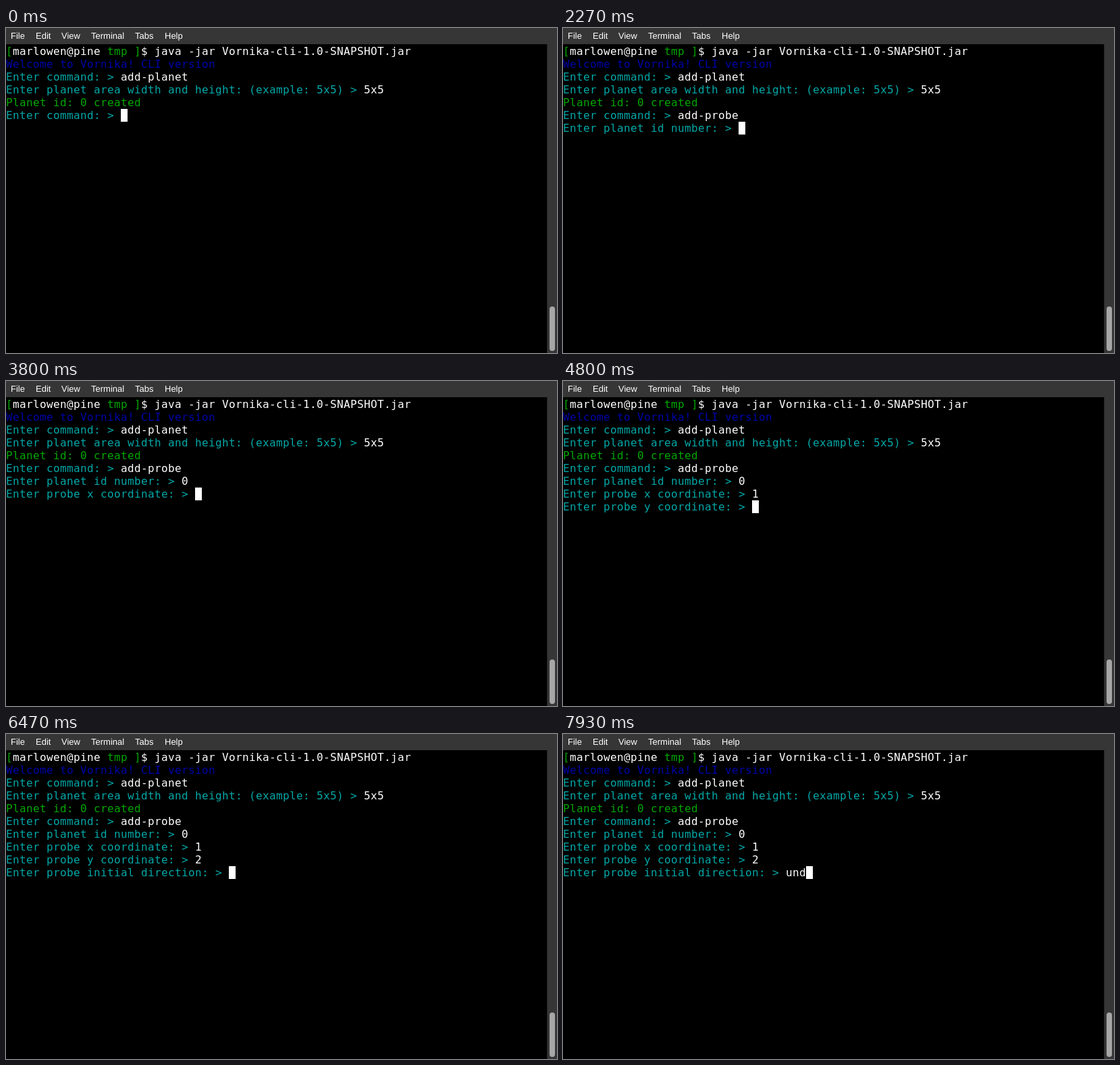
An HTML page that plays this animation: 816x482 px, repeating every 8 s.

```html
<!DOCTYPE html>
<html lang="en">
<head>
<meta charset="utf-8">
<title>Terminal session</title>
<style>
  html, body { margin: 0; width: 100%; height: 100%; overflow: hidden; background: #000; }
  svg { display: block; width: 816px; height: 482px; }
  text { white-space: pre; fill: #fff; }
  .menu { font: 13px "Liberation Sans", Arial, sans-serif; text-rendering: geometricPrecision; }
  .term { font: 16px "DejaVu Sans Mono", monospace; letter-spacing: .368px; }
  .cyan { fill: #00a8a8; }
  .green { fill: #00a800; }
  .blue { fill: #0000a8; }
</style>
</head>
<body>
<svg id="stage" viewBox="0 0 816 482">
  <rect width="816" height="482" fill="#000"/>
  <rect width="816" height="24" fill="#363636"/>
  <rect x="801" y="24" width="15" height="458" fill="#363636"/>
  <rect x="801" y="24" width="1" height="458" fill="#26262a"/>
  <rect x="805" y="413" width="8" height="66" rx="4" fill="#a6a6a6"/>
</svg>
<script>
const LOOP = 8000, CELL = 10, ROW = 19, TOP = 25;
const stage = document.getElementById("stage");

function add(tag, attrs, content = "") {
  const el = document.createElementNS("http://www.w3.org/2000/svg", tag);
  for (const key in attrs) el.setAttribute(key, attrs[key]);
  el.textContent = content;
  return stage.appendChild(el);
}

function write(col, row, color, content = "") {
  return add("text", { x: col * CELL, y: TOP + row * ROW + 15, class: "term " + color }, content);
}

let menuX = 7;
for (const name of ["File", "Edit", "View", "Terminal", "Tabs", "Help"]) {
  const label = add("text", { x: Math.round(menuX), y: 16, class: "menu" }, name);
  menuX += label.getComputedTextLength() + 16;
}

// Output already on screen: runs of [color, text] per row
const history = [
  [["green", "["], ["white", "marlowen@pine"], ["green", " tmp ]"],
   ["white", "$ java -jar Vornika-cli-1.0-SNAPSHOT.jar"]],
  [["blue", "Welcome to Vornika! CLI version"]],
  [["cyan", "Enter command: > "], ["white", "add-planet"]],
  [["cyan", "Enter planet area width and height: (example: 5x5) > "], ["white", "5x5"]],
  [["green", "Planet id: 0 created"]]
];
history.forEach((runs, row) => {
  let col = 0;
  for (const [color, content] of runs) {
    write(col, row, color, content);
    col += content.length;
  }
});

// Prompts: time shown, time of first key, ms per key
const steps = [
  { prompt: "Enter command: > ", answer: "add-probe", at: 0, type: 670, key: 140 },
  { prompt: "Enter planet id number: > ", answer: "0", at: 2070, type: 2930, key: 140 },
  { prompt: "Enter probe x coordinate: > ", answer: "1", at: 3400, type: 4130, key: 140 },
  { prompt: "Enter probe y coordinate: > ", answer: "2", at: 4470, type: 4930, key: 140 },
  { prompt: "Enter probe initial direction: > ", answer: "und", at: 5330, type: 7530, key: 140 }
];
steps.forEach((step, i) => {
  step.row = history.length + i;
  step.label = write(0, step.row, "cyan", step.prompt);
  step.input = write(step.prompt.length, step.row, "white");
});
const cursor = add("rect", { width: CELL, height: ROW, fill: "#fff" });

function draw(t) {
  for (const step of steps) {
    const shown = t >= step.at;
    const typed = Math.floor((t - step.type) / step.key) + 1;
    const count = Math.max(0, Math.min(step.answer.length, typed));
    step.label.setAttribute("visibility", shown ? "visible" : "hidden");
    step.input.textContent = step.answer.slice(0, count);
    if (shown) {
      cursor.setAttribute("x", (step.prompt.length + count) * CELL);
      cursor.setAttribute("y", TOP + step.row * ROW);
    }
  }
}

const start = performance.now();
function tick() {
  draw((performance.now() - start) % LOOP);
  requestAnimationFrame(tick);
}
tick();
</script>
</body>
</html>
```
